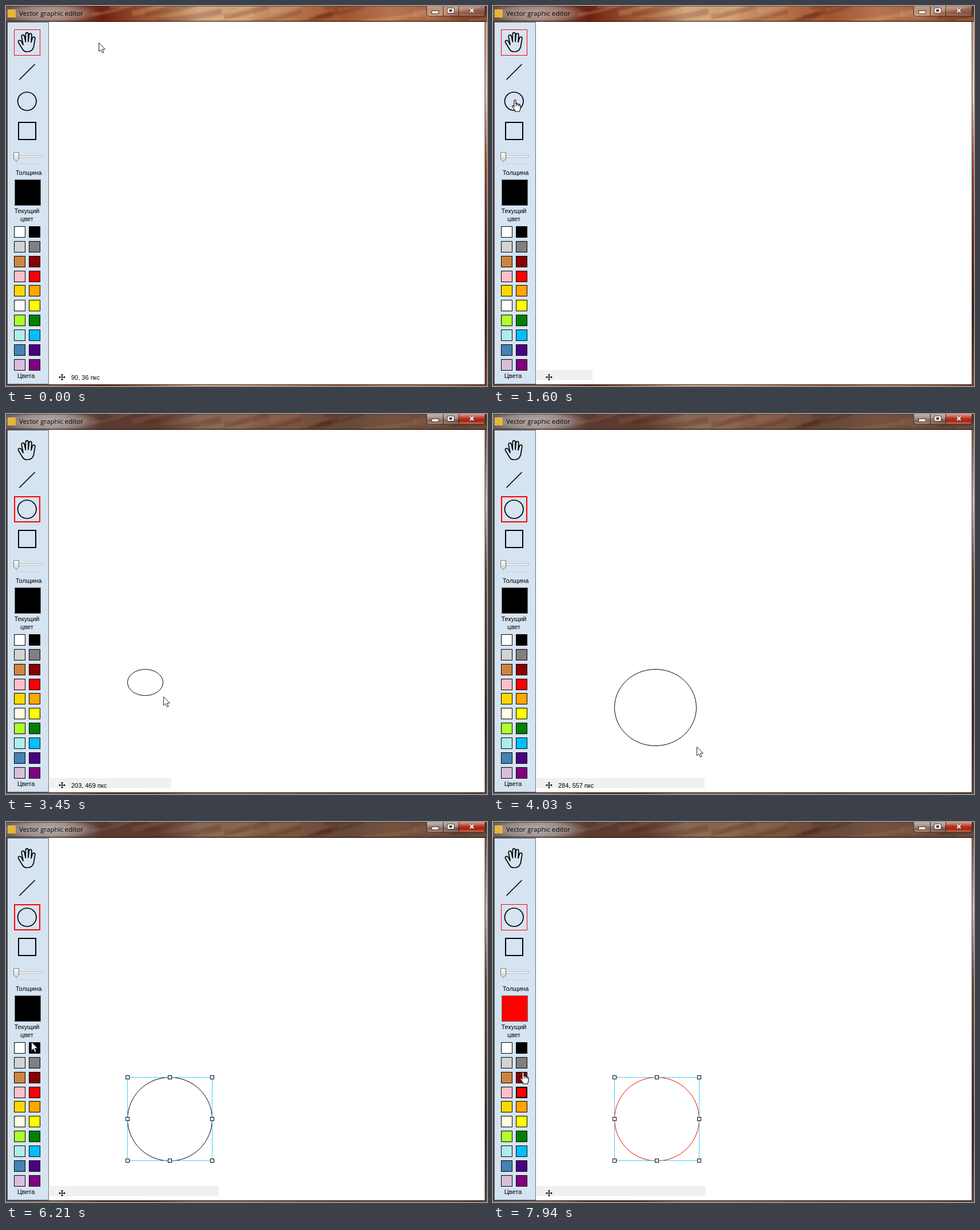
An HTML page with a canvas for the animation above (8 s loop, 841 px wide and 666 px high).

```html
<!DOCTYPE html>
<html lang="ru">
<head>
<meta charset="utf-8">
<title>Vector graphic editor</title>
<style>
html, body { margin: 0; width: 100%; height: 100%; overflow: hidden; background: #fff; }
canvas { display: block; }
</style>
</head>
<body>
<canvas id="stage" width="841" height="666"></canvas>
<script>
const LOOP = 8000;
const c = document.getElementById('stage').getContext('2d');
const UI = '11px "Liberation Sans", Arial, sans-serif';

// Pointer moves: start, end, number of steps, evenly timed points
const moves = [
  [560, 900, 7, [[162, 63], [115, 50], [65, 40], [33, 47]]],
  [1070, 1600, 10, [[33, 47], [44, 105], [38, 164]]],
  [2310, 3080, 13, [[38, 164], [38, 164], [38, 164], [62, 195], [145, 325], [200, 425], [211, 446]]],
  [3120, 3910, 14, [[211, 446], [229, 458], [251, 476], [275, 494], [301, 520], [326, 547], [344, 567], [355, 580]]],
  [3970, 4510, 10, [[355, 580], [361, 592]]],
  [5070, 5130, 2, [[361, 592], [361, 594]]],
  [5320, 6100, 14, [[361, 594], [300, 560], [180, 460], [70, 375], [46, 366]]],
  [6150, 6450, 6, [[45, 368], [44, 384], [47, 440], [48, 467]]],
  [6820, 6870, 2, [[48, 467], [48, 472]]],
  [7880, 7940, 2, [[48, 472], [52, 438]]]
];

const swatches = ['#fff', '#000', '#d3d3d3', '#808080', '#cd853f', '#8b0000', '#ffc0cb', '#f00',
  '#ffd700', '#ffa500', '#ffffe0', '#ff0', '#adff2f', '#008000', '#afeeee', '#00bfff',
  '#4682b4', '#4b0082', '#d8bfd8', '#800080'];

const palm = new Path2D('M30 68L27.3 54C26.6 50.3 31.2 49.3 32.2 53L34.3 63V49.5C34.3 45.7 39 45.7 39 49.5V62.5' +
  'L40.2 50.5C40.6 47 45 47.4 44.8 51L44 63.5L46.2 56C47.2 53 51.3 54 50.8 57.2L48.5 71' +
  'C47 77.5 44 80 38.5 80H36Q31 80 28.5 75L21.8 64C20.3 61 24 58.6 26.3 61.3L30 68');
const arrow = new Path2D('M.5 .5V16L4 12.5L6.5 18.3L9 17.3L6.6 11.7H11.3Z');
const pointer = new Path2D('M4 2Q4 .5 5.5 .5Q7 .5 7 2V7Q9.5 6 10 8Q12 7 12.5 9Q15 8.5 15 11V15' +
  'Q15 18 13 21H6Q5.5 18 1 13Q0 11 2 10.5L4 12.5Z');
const knuckles = new Path2D('M7.5 7V11M10 8V11M12.5 9V12');
const cross = new Path2D('M93 650.5H103M98 645.5V655.5M94.5 649L93 650.5L94.5 652M101.5 649L103 650.5L101.5 652' +
  'M96.5 647L98 645.5L99.5 647M96.5 654L98 655.5L99.5 654');

function pointerAt(t) {
  let at = moves[0][3][0];
  for (const [start, end, steps, pts] of moves) {
    if (t < start) break;
    const k = Math.min(steps, Math.floor((t - start) / (end - start) * (steps - 1) + 1e-6) + 1);
    const u = k / steps * (pts.length - 1);
    const i = Math.min(pts.length - 2, Math.floor(u + 1e-6));
    at = pts[i].map((v, j) => Math.round(v + (pts[i + 1][j] - v) * (u - i)));
  }
  return at;
}

function box(x, y, w, h, fill, stroke, line = 1) {
  if (fill) { c.fillStyle = fill; c.fillRect(x, y, w, h); }
  if (stroke) {
    c.strokeStyle = stroke;
    c.lineWidth = line;
    c.strokeRect(x + line / 2, y + line / 2, w - line, h - line);
  }
}

function outline(path, color, width, fill) {
  if (fill) { c.fillStyle = fill; c.fill(path); }
  c.strokeStyle = color;
  c.lineWidth = width;
  c.stroke(path);
}

function text(str, x, y, align = 'center', font = UI) {
  c.font = font;
  c.textAlign = align;
  c.fillStyle = '#000';
  c.fillText(str, x, y);
}

function ramp(x1, y1, x2, y2, colors) {
  const g = c.createLinearGradient(x1, y1, x2, y2);
  colors.forEach((col, i) => g.addColorStop(i / (colors.length - 1), col));
  return g;
}

function ellipse(x1, y1, x2, y2, color, width) {
  const path = new Path2D();
  path.ellipse((x1 + x2) / 2, (y1 + y2) / 2, Math.abs(x2 - x1) / 2, Math.abs(y2 - y1) / 2, 0, 0, 7);
  outline(path, color, width);
}

function drawFrame(active) {
  box(0, 0, 841, 666, ramp(0, 0, 841, 0, active
    ? ['#6c5f5b', '#82726c', '#5a3a31', '#5c3a2e', '#876853', '#84614c', '#79543f', '#64483a', '#74523e', '#6b4c3b', '#5a4036']
    : ['#6d5048', '#855f50', '#6e2010', '#a05a38', '#d4a880', '#cc9a72', '#b5744c', '#a05430', '#b5744e', '#a66442', '#75351f']));

  // Blurred wallpaper strands behind the glass title bar
  c.save();
  c.beginPath();
  c.rect(145, 0, 696, 27);
  c.clip();
  c.filter = 'blur(1px)';
  let seed = 11;
  const rnd = () => (seed = seed * 16807 % 2147483647) / 2147483647;
  for (let i = 0; i < 22; i++) {
    const x = 150 + rnd() * 660, y = rnd() * 34, len = 50 + rnd() * 70;
    c.strokeStyle = i % 2 ? 'rgba(70,20,8,.18)' : active ? 'rgba(175,135,105,.18)' : 'rgba(240,190,145,.22)';
    c.lineWidth = 5 + rnd() * 7;
    c.beginPath();
    c.moveTo(x, y);
    c.quadraticCurveTo(x + len / 2, y - 4, x + len, y - 18);
    c.stroke();
  }
  c.restore();

  box(0, 28, 2, 636, '#54443e');
  box(838, 28, 3, 635, ramp(0, 28, 0, 663, active
    ? ['#80604e', '#d8b8b0', '#70503e', '#59402f', '#3e2923', '#5d493d']
    : ['#dfa078', '#f2cfae', '#a85030', '#713018', '#471a10', '#80452d']));
  const glow = c.createRadialGradient(0, 0, 0, 0, 0, 1);
  glow.addColorStop(0, 'rgba(255,255,255,.42)');
  glow.addColorStop(.65, 'rgba(255,255,255,.25)');
  glow.addColorStop(1, 'rgba(255,255,255,0)');
  c.save();
  c.translate(78, 13);
  c.scale(88, 18);
  box(-1, -1, 2, 2, glow);
  c.restore();
  box(0, 0, 841, 1, 'rgba(30,15,10,.5)');
  box(1, 26, 837, 638, null, '#33241f');
  box(3, 6, 14, 14, '#e6b63c');
  text('Vector graphic editor', 23, 17, 'left', '11.5px "Open Sans", "Noto Sans", sans-serif');

  // Window buttons
  c.beginPath();
  c.roundRect(735.5, -4, 102, 22, 4);
  c.fillStyle = ramp(0, 0, 0, 18, active
    ? ['rgba(255,255,255,.6)', 'rgba(255,255,255,.42)', 'rgba(255,255,255,.08)', 'rgba(255,255,255,.32)']
    : ['rgba(255,255,255,.4)', 'rgba(255,255,255,.25)', 'rgba(255,255,255,.15)', 'rgba(255,255,255,.25)']);
  c.fill();
  if (active) box(792, 0, 45, 17, ramp(0, 0, 0, 17, ['#dda092', '#cb6653', '#ad2e1b', '#a52612', '#d06a4b']));
  c.strokeStyle = '#3b2822';
  c.lineWidth = 1;
  c.stroke();
  box(764, 0, 1, 18, '#3b2822');
  box(791, 0, 1, 18, '#3b2822');
  box(744, 8, 13, 6, '#fff', '#4b3c3a');
  box(771, 3, 13, 10, '#4b3c3a');
  box(772, 4, 11, 8, '#fff');
  box(775, 6, 5, 4, '#4b3c3a');
  const x = new Path2D('M811.5 4.5L817.5 11M817.5 4.5L811.5 11');
  outline(x, '#4b3c3a', 4);
  outline(x, '#fff', 2.2);
}

function drawSidebar(t) {
  const red = t >= 7020;
  box(2, 28, 73, 635, '#d6e3f1', '#65717e');

  if (t < 2430) box(14, 41, 46, 46, null, '#f00');
  else box(14, 144, 46, 46, null, '#f00', red ? 1 : 2);
  c.lineJoin = c.lineCap = 'round';
  outline(palm, '#000', 1.7);
  outline(new Path2D('M24 128.5L50 102.5'), '#000', 1.7);
  ellipse(20.5, 151, 53, 183, '#000', 1.7);
  box(21, 203, 32, 32, null, '#000', 2);
  c.lineJoin = 'miter';
  c.lineCap = 'butt';

  // Thickness slider
  box(13, 262, 50, 4, '#f4f6f8', '#b5bdc6');
  for (let i = 0; i < 11; i++) box(18 + i * 4, 275, 1, 3, '#bcc6d0');
  outline(new Path2D('M13.5 256.5H22.5V268L18 272.5L13.5 268Z'), '#737373', 1, ramp(0, 256, 0, 272, ['#fff', '#d4d4d4']));

  text('Толщина', 39.5, 296);
  box(15, 304, 46, 46, red ? '#f00' : '#000', '#666');
  text('Текущий', 36.5, 363);
  text('цвет', 36.5, 377);
  swatches.forEach((color, i) => {
    const pale = t < 2310 && i === 10;
    box(14 + i % 2 * 26, Math.round(386 + (i >> 1) * 25.85), 20, 20, pale ? '#fff' : color, '#000', red && i === 7 ? 2 : 1);
  });
  text('Цвета', 35, 652);
}

function drawStatus(t, x, y) {
  const right = t < 560 ? 0 : t < 2310 ? 174 : t < 5320 ? Math.min(372, x + 14) : 372;
  if (right > 76) {
    box(76, 638, Math.min(right, 235) - 76, 18, '#f0f0f0');
    if (right > 235) box(235, 638, right - 235, 17, '#f0f0f0');
  }
  outline(cross, '#000', 1.1);
  if (x > 75) text(t < 560 ? '90, 36 пкс' : `${x - 72}, ${y - 25} пкс`, 114, 655, 'left');
}

function drawShape(t, x, y) {
  if (t < 3120) return;
  if (t < 5320) return ellipse(212.5, 447.5, x - .5, y - .5, '#000', 1);
  ellipse(212.5, 447.5, 360.5, 594, t < 7020 ? '#000' : '#f00', 1);
  c.setLineDash([3, 1]);
  box(212, 447, 149, 147, null, '#00bfff');
  c.setLineDash([]);
  for (const hx of [209, 283, 357])
    for (const hy of [444, 517, 590])
      if (hx !== 283 || hy !== 517) box(hx, hy, 7, 7, '#fff', '#000');
}

function drawPointer(t, x, y) {
  const hand = x < 60 && (t < 2700 || t > 6215);
  c.save();
  if (hand) {
    c.translate(x - 5, y);
    outline(pointer, '#000', 1.1, '#fff');
    outline(knuckles, '#000', 1);
  } else {
    c.translate(x, y + 1);
    outline(arrow, '#20243c', 1, '#fff');
  }
  c.restore();
}

function draw(now) {
  const t = now % LOOP;
  const [x, y] = pointerAt(t);
  drawFrame(t >= 2310);
  box(75, 28, 762, 635, '#fff');
  drawSidebar(t);
  drawStatus(t, x, y);
  drawShape(t, x, y);
  drawPointer(t, x, y);
}

const begin = performance.now();
function tick() {
  draw(performance.now() - begin);
  requestAnimationFrame(tick);
}
tick();
</script>
</body>
</html>
```
